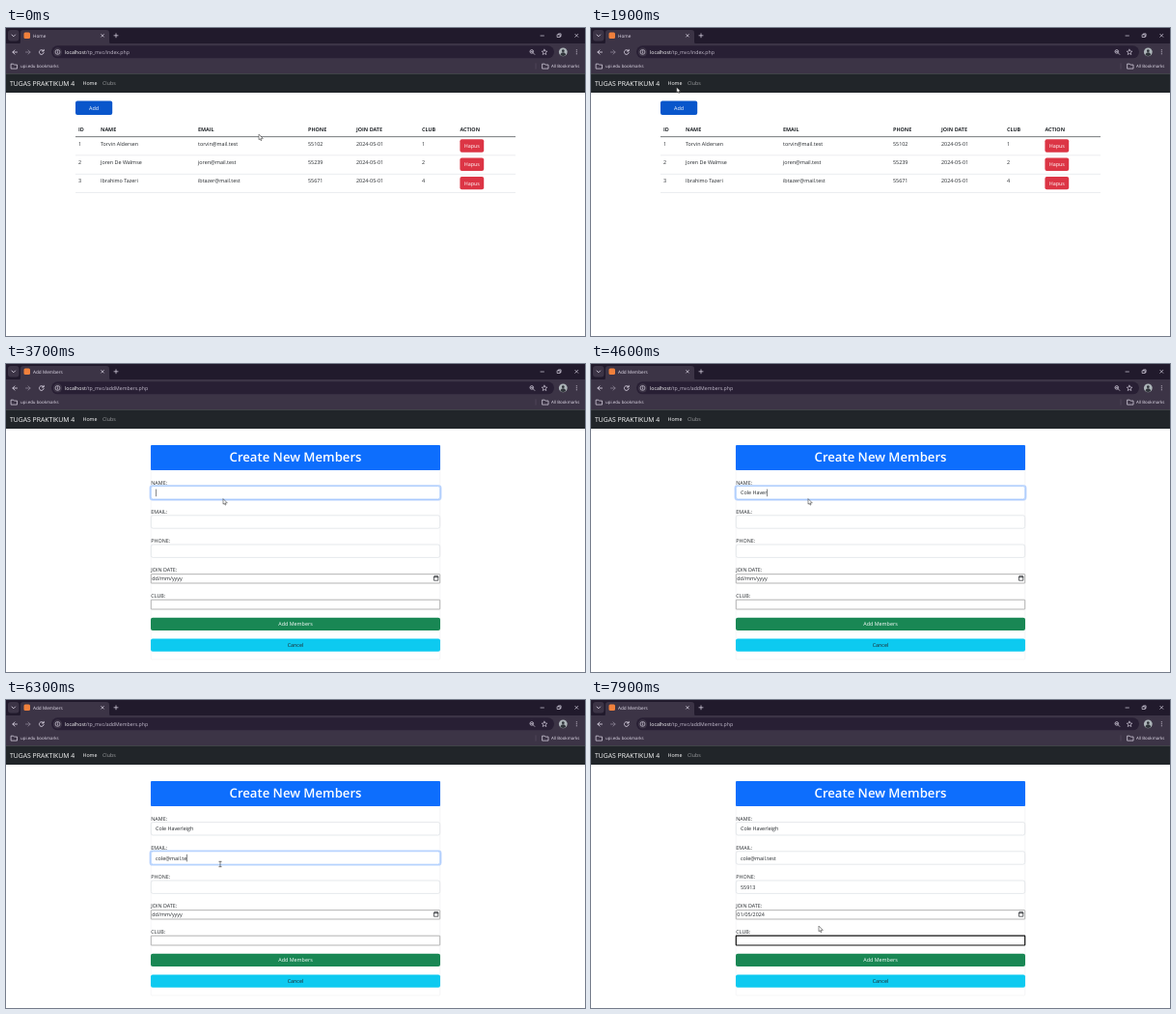
An HTML page that plays this animation: 600 px wide and 319 px high, repeating every 8000 ms.

```html
<!DOCTYPE html>
<html lang="en">
<head>
<meta charset="utf-8">
<title>Members demo</title>
<style>
  html, body { margin: 0; width: 100%; height: 100%; overflow: hidden; background: #fff; }
  svg { display: block; width: 100%; height: 100%; }
  text { font-family: "Open Sans", "Noto Sans", sans-serif; text-rendering: geometricPrecision; white-space: pre; }
</style>
</head>
<body>
<svg id="stage" viewBox="0 0 600 319">
  <defs>
    <linearGradient id="fade">
      <stop offset="0" stop-color="#3c3446" stop-opacity="0"/>
      <stop offset="1" stop-color="#3c3446"/>
    </linearGradient>
  </defs>
</svg>
<script>
const LOOP = 8000, STEP = 100;
const INK = '#212529', LINE = '#dee2e6', LIGHT = '#e4deec', BAR = '#3c3446', STRIP = '#211a2c';
const stage = document.getElementById('stage');

function el(parent, tag, attrs = {}) {
  const node = document.createElementNS('http://www.w3.org/2000/svg', tag);
  for (const k in attrs) node.setAttribute(k, attrs[k]);
  return parent.appendChild(node);
}
const group = (parent = stage) => el(parent, 'g');
const box = (p, x, y, width, height, fill, rx = 0, more = {}) =>
  el(p, 'rect', { x, y, width, height, fill, rx, ...more });
const path = (p, d, stroke, width = 0.8, fill = 'none') =>
  el(p, 'path', { d, stroke, fill, 'stroke-width': width, 'stroke-linecap': 'round', 'stroke-linejoin': 'round' });
const ring = (p, cx, cy, r, stroke, width = 0.7) =>
  el(p, 'circle', { cx, cy, r, stroke, fill: 'none', 'stroke-width': width });
function label(p, x, y, str, size = 5.4, fill = INK, more = {}) {
  const node = el(p, 'text', { x, y, 'font-size': size, fill, ...more });
  node.textContent = str;
  return node;
}
const MID = { 'text-anchor': 'middle' };
const show = (node, on) => node.setAttribute('visibility', on ? 'visible' : 'hidden');

// Browser window
box(stage, 0, 0, 600, 319, '#fff');
box(stage, 0, 0, 600, 17, STRIP);
box(stage, 0, 16, 600, 31.3, BAR);
box(stage, 2, 2, 11.5, 11.5, BAR, 3);
path(stage, 'M6 7l1.8 1.8L9.6 7', LIGHT);
path(stage, 'M13 16.5q2 0 2-2.5V5q0-3 3-3H104q3 0 3 3v9q0 2.5 2 2.5z', 'none', 0, BAR);
const title = label(stage, 28, 9.9, '', 4.7, LIGHT);
box(stage, 84, 3, 10, 11, 'url(#fade)');
box(stage, 94, 3, 12, 11, BAR);
const icon = box(stage, 18.5, 4.5, 6.5, 6.5, '#f0803c', 1.5);
const globe = group();
ring(globe, 21.8, 7.8, 2.5, '#c9c3d2', 0.8);
path(globe, 'M19.5 7h2.6l-.6 1.6h2.6', '#c9c3d2', 0.7);
path(stage, 'M98.7 6.5l2.6 2.6m0-2.6l-2.6 2.6M112 7.8h4m-2-2v4', LIGHT, 0.7);
path(stage, 'M554 8h3.4M571.5 6.8h2.7v2.7h-2.7zM572.4 6.8v-.9h2.7v2.7h-.9M589.8 6.3l3 3m0-3l-3 3', LIGHT, 0.65);

path(stage, 'M11.5 25H7m2-2.1L6.9 25 9 27.1', LIGHT);
path(stage, 'M20.5 25H25m-2-2.1l2.1 2.1-2.1 2.1', '#8c8496');
const reload = path(stage, 'M38.7 23.5A2.4 2.4 0 1 0 39.2 25.5M39.2 22.3v1.7h-1.7', LIGHT);
const stop = path(stage, 'M35 23l4 4m0-4l-4 4', LIGHT);
box(stage, 47, 18.3, 521, 13, '#281f34', 6.5);
el(stage, 'circle', { cx: 53.5, cy: 24.9, r: 4.6, fill: BAR });
ring(stage, 53.5, 24.9, 2.4, LIGHT, 0.6);
path(stage, 'M53.5 24.7v1.3M53.5 23.6v.05', LIGHT, 0.6);
const url = label(stage, 61, 26.9, '', 5.2, '#fff');
const host = el(url, 'tspan'), file = el(url, 'tspan', { fill: '#c6bfcf' });
host.textContent = 'localhost';
ring(stage, 544.8, 24.4, 1.8, LIGHT);
path(stage, 'M546.2 25.8l1.6 1.6M544 24.4h1.6', LIGHT, 0.7);
path(stage, 'M558 22.2l.8 1.8 2 .2-1.5 1.3.5 2-1.8-1.1-1.8 1.1.5-2-1.5-1.3 2-.2z', LIGHT, 0.6);
el(stage, 'circle', { cx: 577.3, cy: 24.8, r: 4.4, fill: '#aeb6ba' });
el(stage, 'circle', { cx: 577.3, cy: 23.7, r: 1.4, fill: '#30343a' });
path(stage, 'M574.5 28q.3-2.8 2.8-2.8t2.8 2.8q-2.8 2-5.6 0z', 'none', 0, '#30343a');
path(stage, 'M591.3 22.8v.05M591.3 24.8v.05M591.3 26.8v.05', LIGHT, 1);

for (const x of [5.5, 556]) path(stage, `M${x} 37.2h2.2l.8.9h3v4h-6z`, LIGHT, 0.7);
label(stage, 15, 41.2, 'upi.edu bookmarks', 4.4, LIGHT);
label(stage, 565, 41.2, 'All Bookmarks', 4.43, LIGHT);
box(stage, 548.7, 36.5, 0.6, 6, '#5c5268');

box(stage, 0, 47.2, 600, 19.8, INK);
label(stage, 4, 59.7, 'TUGAS PRAKTIKUM 4', 6.83, '#fff');
const navHome = label(stage, 79.5, 59.4, 'Home', 5.3, '#fff');
const navClubs = label(stage, 100, 59.4, 'Clubs', 5.3, '#fff');

// Tables
function table(headY, lineY, cols, heads, rows) {
  const g = group(), last = cols[cols.length - 1];
  box(g, 72, 75.5, 38.2, 14.6, '#0956cb', 2);
  label(g, 91, 84.8, 'Add', 5.4, '#fff', MID);
  heads.forEach((h, i) => label(g, cols[i], headY, h, 5.4, INK, { 'font-weight': 700 }));
  box(g, 72, lineY, 456, 0.8, '#55595d');
  rows.forEach((row, r) => {
    const y = lineY + r * 19.3;
    row.forEach((cell, i) => label(g, cols[i], y + 9.2, cell));
    box(g, last, y + 3, 24.8, 13.4, '#dc3545', 2);
    label(g, last + 12.4, y + 11.7, 'Hapus', 5.4, '#fff', MID);
    box(g, 72, y + 19.3, 456, 0.6, LINE);
  });
  return g;
}
const home = table(107.4, 112.3, [75, 98, 199, 313, 363, 431, 470.4],
  ['ID', 'NAME', 'EMAIL', 'PHONE', 'JOIN DATE', 'CLUB', 'ACTION'], [
    ['1', 'Torvin Aldersen', 'torvin@mail.test', '55102', '2024-05-01', '1'],
    ['2', 'Joren De Walmse', 'joren@mail.test', '55239', '2024-05-01', '2'],
    ['3', 'Ibrahimo Tazeri', 'ibtazer@mail.test', '55671', '2024-05-01', '4'],
  ]);
const TOP = 'Summit Division', SUR = 'La Tabla', NORD = 'Nordstaffel';
const clubs = table(104.6, 109.9, [75, 114, 276, 427],
  ['ID', 'NAME', 'LEAGUE', 'ACTIONS'], [
    ['Tarvick', TOP], ['Wexholm Borough', TOP], ['Dunmerton', TOP], ['Vila Sorena', SUR],
    ['Montereda', SUR], ['Falken Ostberg', NORD], ['Gravheim', NORD], ['Union Peralvega', SUR],
  ].map((row, i) => [String(i + 1), ...row]));

// Form
const form = group();
box(form, 150.2, 84, 299.6, 222, 'none', 1, { stroke: '#ececee', 'stroke-width': 0.5 });
box(form, 150, 84, 300, 26, '#0d6efd', 1);
label(form, 300, 101.4, 'Create New Members', 13.15, '#fff', { ...MID, 'font-weight': 600 });

const SOFT = '#d3d8dd', HARD = '#808080';
const fields = [
  { name: 'NAME:', y: 126.6, h: 13.4, x: 155 },
  { name: 'EMAIL:', y: 156.8, h: 13.4, x: 155 },
  { name: 'PHONE:', y: 187, h: 13.4, x: 155 },
  { name: 'JOIN DATE:', y: 217.7, h: 9.3, x: 151.3, native: true },
  { name: 'CLUB:', y: 244.2, h: 9.8, x: 151.3, native: true },
];
for (const f of fields) {
  label(form, 150.3, f.y - (f.native ? 2.6 : 2.1), f.name);
  f.glow = box(form, 149.3, f.y - 0.7, 301.4, f.h + 1.4, 'none', 2.4, { stroke: '#b9d3fd', 'stroke-width': 1.4 });
  f.edge = box(form, 150.3, f.y, 299.4, f.h, '#fff', f.native ? 0.5 : 2, { 'stroke-width': 0.6 });
  f.mark = box(form, f.x - 0.3, f.y + 1.5, 6.6, 6.6, '#1a73e8');
  f.text = label(form, f.x, f.y + f.h / 2 + (f.native ? 1.8 : 2), '');
  f.caret = box(form, f.x, f.y + 3, 0.55, 7.6, INK);
}
path(form, 'M443.8 220h4v4.2h-4zM443.8 220.8h4M444.8 219.2v.7M446.8 219.2v.7', INK, 0.7);
box(form, 150, 262.8, 300, 13.2, '#198754', 2);
label(form, 300, 271.3, 'Add Members', 5.4, '#fff', MID);
box(form, 150, 284.6, 300, 13.2, '#0dcaf0', 2);
label(form, 300, 293.1, 'Cancel', 5.4, INK, MID);

// Pointer shapes, each with its hot spot at 0,0
const pointers = { arrow: group(), hand: group(), beam: group() };
path(pointers.arrow, 'M0 0v5.2l1.2-1 .9 1.9.9-.4-.8-1.8h1.7z', '#222', 0.5, '#fff');
path(pointers.hand, 'M-.6 .3q.6-.8 1.2 0v2.4l2 .4q.7.3.5 1.1l-.6 2.4h-2.8l-1.9-2.5q0-.7.6-.6l1 .6z', '#222', 0.45, '#fff');
path(pointers.beam, 'M-1.2-2.7h2.4M0-2.7v5.4M-1.2 2.7h2.4', '#333', 0.6);

// time, x, y, pointer shape from then on
const moves = [
  [0, 262, 110.5, 'arrow'], [200, 259, 109, 'arrow'], [800, 112, 59, 'hand'], [1000, 109, 57.5, 'hand'],
  [1300, 109, 57.5, 'hand'], [1600, 88, 57, 'hand'], [1800, 88, 57.5, 'arrow'], [2200, 93, 83, 'hand'],
  [2400, 94.5, 85, 'arrow'], [2500, 96.5, 87, 'arrow'], [2700, 100, 91, 'arrow'], [3200, 212, 134, 'beam'],
  [3500, 218, 135, 'beam'], [3700, 225, 140, 'arrow'], [4800, 225, 140, 'arrow'], [5000, 222, 164, 'beam'],
  [5500, 222, 170, 'beam'], [6300, 222, 170, 'beam'], [6600, 197, 194, 'beam'], [6900, 195, 197, 'beam'],
  [7100, 195, 197, 'arrow'], [7300, 199, 222, 'arrow'], [7500, 205, 223, 'arrow'], [7800, 233, 234, 'arrow'],
  [7900, 236, 234.5, 'arrow'], [8000, 236, 234.5, 'arrow'],
];

const pages = [
  { at: 0, view: home, title: 'Home', file: 'index' },
  { at: 1000, view: clubs, title: 'Clubs', file: 'club', globeTill: 1400 },
  { at: 1700, view: home, title: 'Home', file: 'index' },
  { at: 2400, view: form, title: 'localhost/tp_mvc/addMembers.php', file: 'addMembers', globeTill: 2600, busy: true },
  { at: 2600, view: form, title: 'Add Members', file: 'addMembers' },
];
const focuses = [[3300, 0], [5000, 1], [6600, 2], [7300, 3], [7800, 4]];
const current = (list, t, key) => list.filter(item => item[key] <= t).pop();

const typed = (str, t, start, gap) => str.slice(0, Math.max(0, Math.floor((t - start) / gap)));
const dateAt = t => [t < 7400 ? 'dd' : '01', t < 7500 ? 'mm' : '05', t < 7700 ? 'yyyy' : '2024'].join('/');

function drawPage(t) {
  const page = current(pages, t, 'at');
  for (const view of [home, clubs, form]) show(view, view === page.view);
  title.textContent = page.title;
  file.textContent = `/tp_mvc/${page.file}.php`;
  const loading = t < page.globeTill;
  show(globe, loading);
  show(icon, !loading);
  show(stop, page.busy);
  show(reload, !page.busy);
  const onClubs = page.view === clubs;
  navHome.setAttribute('fill', onClubs ? '#9b9d9f' : '#fff');
  navClubs.setAttribute('fill', onClubs ? '#e6e7e7' : '#9b9d9f');
  return page.view === form;
}

function drawFields(t, visible) {
  const [since, active] = current(focuses, t, 0) || [0, -1];
  const values = [
    typed('Cole Haverleigh', t, 3900, 65),
    typed('cole@mail.test', t, 5100, 100),
    typed('55913', t, 6820, 75),
    dateAt(t),
    '',
  ];
  fields.forEach((f, i) => {
    const on = visible && i === active;
    f.text.textContent = values[i];
    show(f.glow, on && !f.native);
    f.edge.setAttribute('stroke', on ? (f.native ? '#101010' : '#86b7fe') : f.native ? HARD : SOFT);
    f.edge.setAttribute('stroke-width', on && f.native ? 1.2 : 0.6);
    const editing = i === 3 && on && t < 7700;
    show(f.mark, editing);
    if (editing) {
      f.mark.setAttribute('x', t < 7400 ? f.x - 0.3 : t < 7500 ? f.x + 8.3 : f.x + 18.5);
      f.mark.setAttribute('width', t < 7500 ? 7.5 : 12);
    }
    const blink = values[i] || (t - since) % 1000 < 500;
    show(f.caret, on && !f.native && blink);
    if (on && !f.native) f.caret.setAttribute('x', f.x + (values[i] ? f.text.getComputedTextLength() : 0) + 0.1);
  });
}

function drawPointer(t) {
  const i = moves.findLastIndex(m => m[0] <= t);
  const a = moves[i], b = moves[i + 1];
  const p = (t - a[0]) / (b[0] - a[0]), ease = p * p * (3 - 2 * p);
  const x = a[1] + (b[1] - a[1]) * ease, y = a[2] + (b[2] - a[2]) * ease;
  for (const name in pointers) show(pointers[name], name === a[3]);
  pointers[a[3]].setAttribute('transform', `translate(${x} ${y})`);
}

const begin = performance.now();
function frame() {
  const t = Math.floor((performance.now() - begin) % LOOP / STEP) * STEP;
  drawFields(t, drawPage(t));
  drawPointer(t);
  requestAnimationFrame(frame);
}
frame();
</script>
</body>
</html>
```
